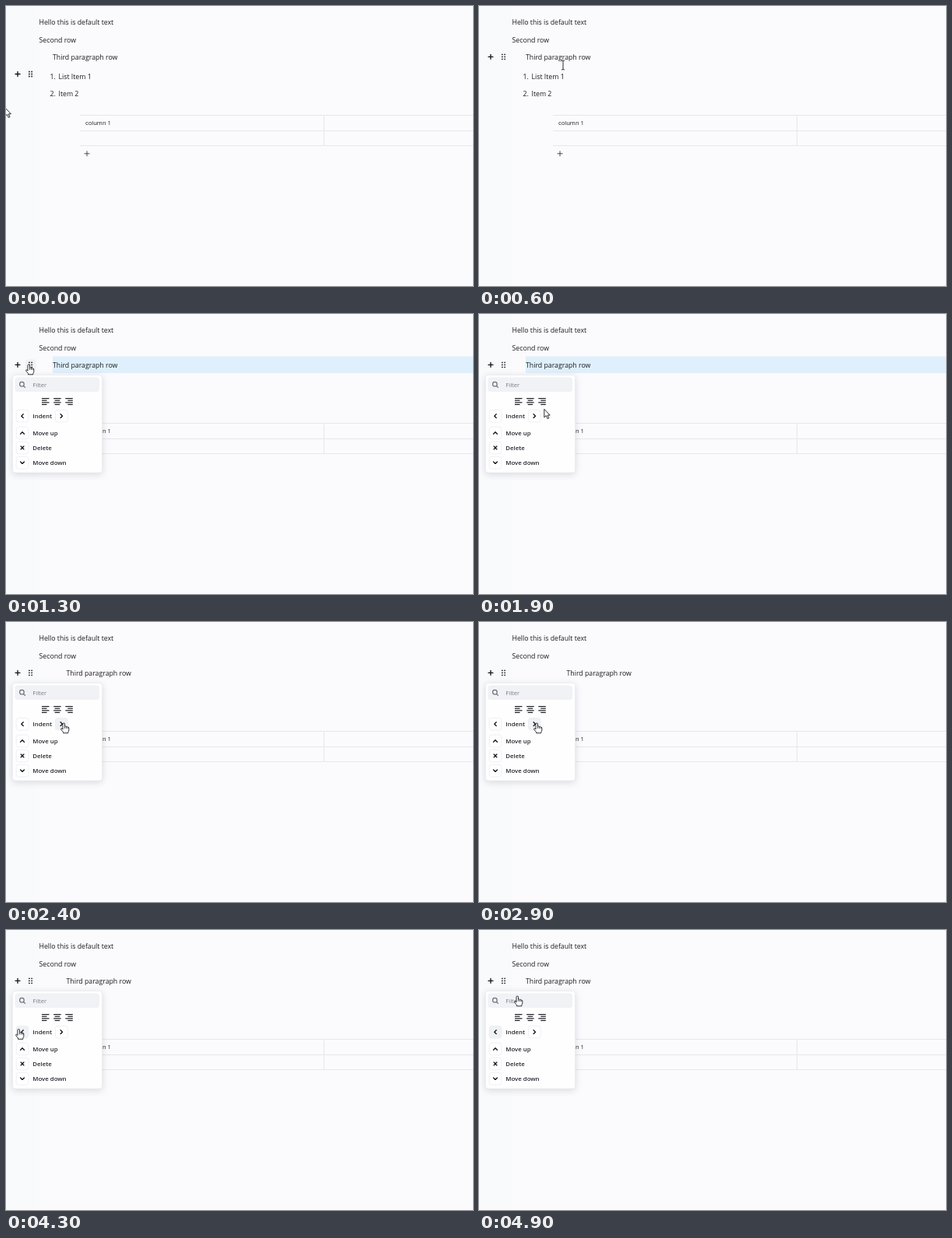
These frames come from a looping animation (600 by 360 pixels, 5000 ms). An HTML page:

```html
<!DOCTYPE html>
<html lang="en">
<head>
<meta charset="utf-8">
<title>Block editor: indent tune</title>
<style>
  html, body { margin: 0; width: 100%; height: 100%; overflow: hidden; background: #fbfafd; }
  svg { display: block; width: 100vw; height: 100vh; }
  text { font: 8.75px "Open Sans", "Noto Sans", sans-serif; fill: #1c1d22; white-space: pre; }
  .cell { font-size: 7.64px; }
  .label { font-size: 7.8px; font-weight: 600; fill: #25272d; }
  .filter { font-size: 7.6px; font-weight: 500; fill: #777c87; }
  .tip { font-size: 7.15px; fill: #f2f3f7; }
  .rule { stroke: #e7e7ec; fill: none; }
  .icon { stroke: #15161b; stroke-width: 1.35; fill: none; stroke-linecap: round; stroke-linejoin: round; }
  .btn { fill: #fff; stroke: #ebecf0; stroke-width: .8; }
  .btn.on { fill: #eff2f4; }
  .pointer { fill: #fff; stroke: #17181c; stroke-width: .9; stroke-linejoin: round; }
  #menuBox { filter: drop-shadow(0 2px 4px rgba(13, 20, 33, .14)); }
  #tipBox { filter: drop-shadow(0 2px 3px rgba(13, 20, 33, .28)); }
</style>
</head>
<body>
<svg viewBox="0 0 600 360">
  <defs>
    <linearGradient id="side">
      <stop offset="0" stop-color="#f8fafc"/>
      <stop offset=".88" stop-color="#f8fafc"/>
      <stop offset="1" stop-color="#fbfafd"/>
    </linearGradient>
  </defs>
  <rect width="600" height="360" fill="#fbfafd"/>
  <rect width="44" height="360" fill="url(#side)"/>

  <text x="42.5" y="23.8">Hello this is default text</text>
  <text x="42.5" y="46.6">Second row</text>
  <rect id="glow" x="60" y="54.5" width="540" height="21.5" fill="#dff0fc"/>
  <text id="row" y="68.7">Third paragraph row</text>
  <path id="caret" d="M76 59.5V71" stroke="#222" stroke-width=".9"/>

  <g id="list">
    <text x="56.5" y="94.3">1.</text><text x="67.5" y="94.3">List Item 1</text>
    <text x="56.5" y="116.2">2.</text><text x="67.5" y="116.2">Item 2</text>
  </g>

  <path class="rule" d="M95 140.5H600M95 160.5H600M95 179.5H600M408.5 140V180"/>
  <text class="cell" x="102" y="153.3">column 1</text>
  <path d="M100.5 189.8h7M104 186.3v7" stroke="#3a3c43" stroke-width=".9"/>

  <g id="tools">
    <rect id="dotsHover" x="24.5" y="-7" width="14" height="14" rx="3.5" fill="#eff2f4"/>
    <path class="icon" d="M12 0h6M15 -3v6"/>
    <g id="dots" fill="#15161b"></g>
  </g>

  <g id="tooltip">
    <g id="tipBox" fill="#1d202b">
      <rect x="6" y="79" width="51.5" height="14" rx="4"/>
      <path d="M28 79.5l3.5-3 3.5 3z"/>
    </g>
    <text class="tip" x="11" y="88.7">Click to tune</text>
  </g>

  <g id="menu">
    <rect id="menuBox" x="8.5" y="78.5" width="115" height="125.5" rx="3.5" fill="#fefeff" stroke="#ebebf0" stroke-width=".8"/>
    <rect x="11.5" y="81.5" width="108.5" height="18.5" rx="3.5" fill="#f0f2f5"/>
    <path class="icon" style="stroke:#686d78;stroke-width:1.2" d="M23.2 90.2a2.8 2.8 0 1 1 -5.6 0a2.8 2.8 0 1 1 5.6 0M22.5 92.3l2 2"/>
    <text class="filter" x="34.3" y="93.8">Filter</text>
    <g id="aligns" stroke="#202126" stroke-width="1.2"></g>
    <g id="buttons"></g>
  </g>

  <g id="cursor">
    <path id="arrow" class="pointer" d="M0 0V10.6L2.5 8.3L4.3 12.4L6 11.6L4.3 7.8H7.4Z"/>
    <g id="hand">
      <path class="pointer" d="M-1.3 1.1Q-1.3 0 0 0Q1.2 0 1.2 1.1V4.2Q2.4 3.6 3.2 4.6Q4.5 4 5 5.2Q6.5 4.9 6.5 6.2V8.8Q6.5 10.4 5.5 11.2V12.8H-.8V11.5Q-1.9 10.2 -3.5 8.2Q-4 6.6 -2.6 6.7L-1.3 8Z"/>
      <path d="M1.2 4.3V6.8M3.2 4.8V6.9M5 5.4V7" stroke="#17181c" stroke-width=".8"/>
    </g>
    <path id="beam" d="M-2 -6Q0 -6 0 -5Q0 -6 2 -6M0 -5V5M-2 6Q0 6 0 5Q0 6 2 6" fill="none" stroke="#17181c" stroke-width=".9"/>
  </g>
</svg>
<script>
const LOOP = 5000, STEP = 100;
const NS = 'http://www.w3.org/2000/svg';
const $ = id => document.getElementById(id);

function add(parent, tag, attrs, text) {
  const el = document.createElementNS(NS, tag);
  for (const key in attrs) el.setAttribute(key, attrs[key]);
  if (text) el.textContent = text;
  return parent.appendChild(el);
}

for (const x of [29.9, 33.1])
  for (const y of [-3, 0, 3]) add($('dots'), 'circle', { cx: x, cy: y, r: .9 });

// Text alignment icons: anchor is 0 (left), .5 (centre) or 1 (right).
[[46, 0], [61, .5], [76, 1]].forEach(([x, anchor]) => {
  [9.5, 6.5, 9.5, 6.5].forEach((w, i) => {
    const left = x + (9.8 - w) * anchor, y = 108.6 + i * 2.6;
    add($('aligns'), 'path', { d: `M${left} ${y}h${w}` });
  });
});

const glyphs = {
  left: 'M1.2 -2.4L-1.2 0L1.2 2.4',
  right: 'M-1.2 -2.4L1.2 0L-1.2 2.4',
  up: 'M-2.4 1.2L0 -1.2L2.4 1.2',
  down: 'M-2.4 -1.2L0 1.2L2.4 -1.2',
  cross: 'M-1.9 -1.9L1.9 1.9M1.9 -1.9L-1.9 1.9'
};

function button(x, y, glyph, label) {
  const g = add($('buttons'), 'g', { transform: `translate(${x} ${y})` });
  const box = add(g, 'rect', { class: 'btn', x: -7.8, y: -7.8, width: 15.6, height: 15.6, rx: 3 });
  add(g, 'path', { class: 'icon', d: glyphs[glyph] });
  if (label) add(g, 'text', { class: 'label', x: 13.3, y: 2.9 }, label);
  return box;
}

const outdent = button(21, 131.2, 'left', 'Indent');
const indent = button(71.3, 131.2, 'right');
button(21, 153, 'up', 'Move up');
button(21, 172, 'cross', 'Delete');
button(21, 191.2, 'down', 'Move down');

// time, x, y, shape
const path = [
  [0, -1, 131, 'arrow'], [200, -1, 131, 'arrow'], [300, 3, 140, 'arrow'],
  [400, 40, 125, 'arrow'], [500, 85, 98, 'beam'], [600, 108, 76, 'beam'],
  [700, 90, 67, 'beam'], [800, 76, 65.5, 'beam'], [900, 55, 66, 'arrow'],
  [1000, 36, 65.5, 'hand'], [1100, 29.3, 65, 'hand'], [1400, 29.3, 65, 'hand'],
  [1500, 50, 72, 'arrow'], [1700, 125, 100, 'arrow'], [1900, 83.8, 122.3, 'arrow'],
  [2000, 79.5, 129, 'arrow'], [2100, 74.3, 130, 'hand'], [3200, 74.3, 130, 'hand'],
  [3300, 68, 130, 'hand'], [3400, 54, 130, 'arrow'], [3600, 20, 128.5, 'hand'],
  [3700, 16.3, 127.5, 'hand'], [4600, 16.3, 127.5, 'hand'], [4900, 49.3, 85, 'hand'],
  [5000, 49.3, 85, 'hand']
];

// time, indent level
const levels = [[0, 0], [2300, 1], [2600, 2], [2900, 3], [3100, 4], [3800, 3], [4000, 2], [4300, 1], [4600, 0]];

const lastAt = (table, t) => table.findLastIndex(entry => entry[0] <= t);

function show(id, on) { $(id).style.display = on ? '' : 'none'; }

function draw(t) {
  const within = (from, to) => t >= from && t < to;
  const i = lastAt(path, t);
  const [t0, x0, y0, shape] = path[i];
  const [t1, x1, y1] = path[i + 1];
  const k = (t - t0) / (t1 - t0);
  $('cursor').setAttribute('transform', `translate(${x0 + (x1 - x0) * k} ${y0 + (y1 - y0) * k})`);
  for (const id of ['arrow', 'hand', 'beam']) show(id, id === shape);

  const open = t >= 1300;
  $('row').setAttribute('x', 60 + 17.5 * levels[lastAt(levels, t)][1]);
  $('tools').setAttribute('transform', `translate(0 ${t < 600 ? 87.5 : 65.3})`);
  show('dotsHover', within(1000, 1500));
  show('caret', within(800, 1200));
  show('tooltip', within(1100, 1200));
  show('glow', within(1300, 2300));
  show('menu', open);
  show('list', !open);
  indent.classList.toggle('on', within(2100, 3400));
  outdent.classList.toggle('on', t >= 3600);
}

const start = performance.now();
function tick() {
  const t = (performance.now() - start) % LOOP;
  draw(Math.floor(t / STEP) * STEP);
  requestAnimationFrame(tick);
}
tick();
</script>
</body>
</html>
```
